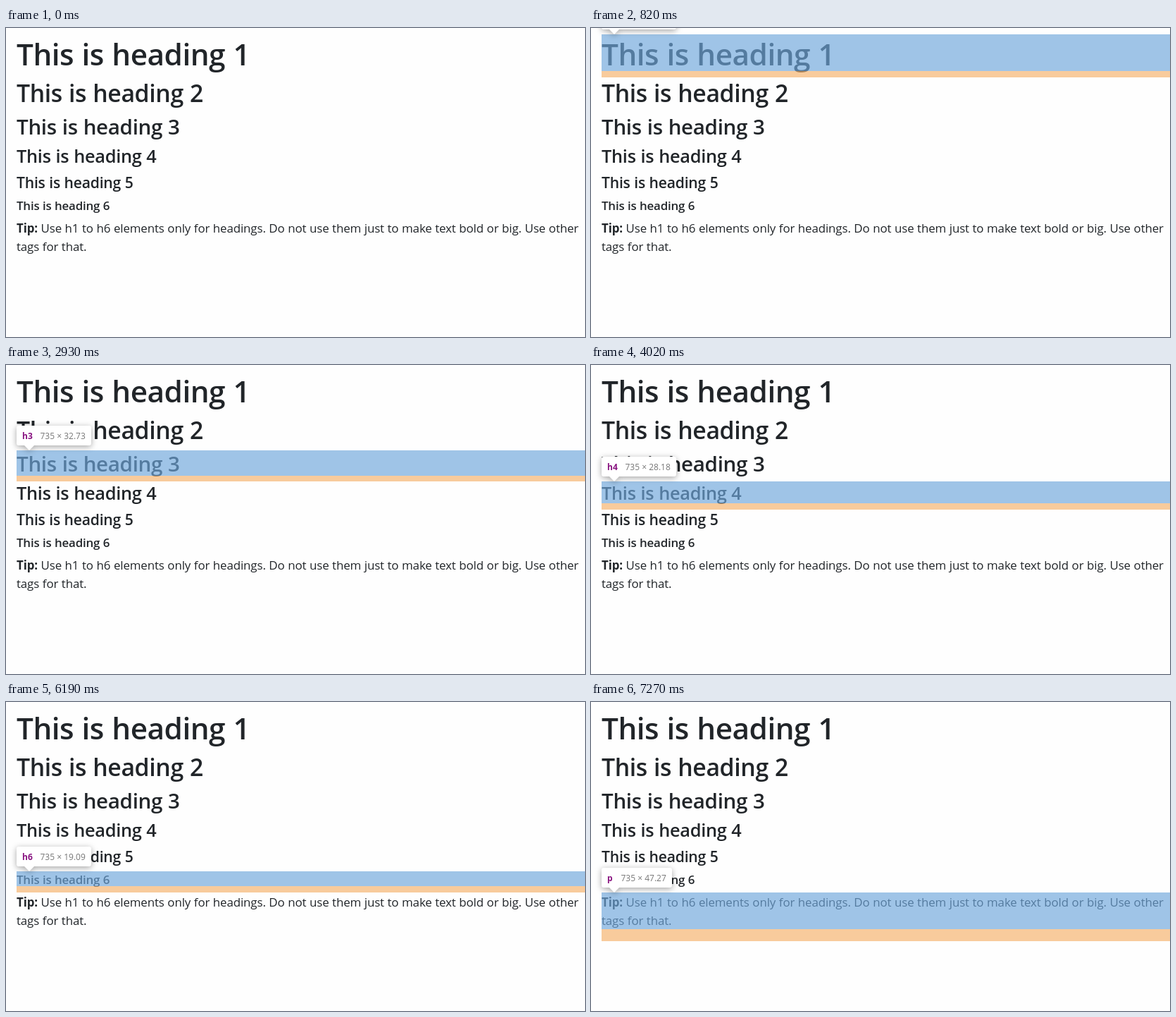
These frames come from a looping animation (822x438 px, 8600 ms). An HTML page:

```html
<!DOCTYPE html>
<html lang="en">
<head>
<meta charset="utf-8">
<title>Heading inspector</title>
<style>
  html, body { margin: 0; width: 100%; height: 100%; overflow: hidden; background: #fefefe; }
  svg { display: block; width: 822px; height: 438px; }
  text { font-family: "Open Sans", "Noto Sans", sans-serif; fill: #212529; white-space: pre; }
  #page text { word-spacing: .02em; }
  .heading { font-weight: 600; letter-spacing: -.011em; }
  .para { font-size: 16.9px; letter-spacing: -.0073em; }
  .para tspan { font-weight: 700; }
  #tip text { font-size: 12px; }
  #tip #tag { font-weight: 700; fill: #881280; }
  #tip #dims { fill: #777; }
  #bubble { fill: #fff; filter: drop-shadow(0 2px 4px rgba(0, 0, 0, .35)); }
</style>
</head>
<body>
<svg viewBox="0 0 822 438">
  <g id="page">
    <text class="para" x="15" y="290"><tspan>Tip:</tspan> Use h1 to h6 elements only for headings. Do not use them just to make text bold or big. Use other</text>
    <text class="para" x="15" y="316">tags for that.</text>
  </g>
  <g id="inspector">
    <rect id="content" x="15" width="807" fill="rgba(111,168,220,.66)"/>
    <rect id="margin" x="15" width="807" fill="rgba(246,178,107,.66)"/>
    <g id="tip">
      <g id="bubble">
        <rect id="box" x="15" y="-35" height="28" rx="3"/>
        <path d="M25-8H41L33 0Z"/>
      </g>
      <text id="tag" x="23" y="-16"></text>
      <text id="dims" y="-16"></text>
    </g>
  </g>
</svg>
<script>
const LOOP = 8600;
const $ = id => document.getElementById(id);

// start: highlight time; top, height, end: content box and bottom of its margin
const items = [
  { tag: 'h1', start: 820,  top: 9,   height: 52, end: 70,  size: 44,   baseline: 53 },
  { tag: 'h2', start: 1840, top: 70,  height: 42, end: 121, size: 35.2, baseline: 105 },
  { tag: 'h3', start: 2930, top: 121, height: 36, end: 165, size: 30.8, baseline: 151 },
  { tag: 'h4', start: 4020, top: 165, height: 31, end: 205, size: 26.4, baseline: 191 },
  { tag: 'h5', start: 5010, top: 205, height: 26, end: 240, size: 22,   baseline: 227 },
  { tag: 'h6', start: 6190, top: 240, height: 21, end: 270, size: 17.6, baseline: 258 },
  { tag: 'p',  start: 7270, top: 270, height: 52, end: 339 }
];

function addHeading({ tag, size, baseline }) {
  const text = document.createElementNS('http://www.w3.org/2000/svg', 'text');
  text.setAttribute('class', 'heading');
  text.setAttribute('x', 15);
  text.setAttribute('y', baseline);
  text.setAttribute('font-size', size * .96);
  text.textContent = 'This is heading ' + tag[1];
  $('page').append(text);
}

function setBand(id, top, bottom) {
  $(id).setAttribute('y', top);
  $(id).setAttribute('height', bottom - top);
}

function inspect(item) {
  $('inspector').style.display = item ? '' : 'none';
  if (!item) return;
  const { tag, top, height, end } = item;
  const isHeading = tag !== 'p';
  setBand('content', top, top + height);
  setBand('margin', top + height, end);
  $('tip').setAttribute('transform', `translate(0 ${top})`);
  $('box').setAttribute('width', isHeading ? 106 : 100);
  $('tag').textContent = tag;
  $('dims').setAttribute('x', isHeading ? 48.5 : 42.5);
  $('dims').textContent = `735 × ${(height / 1.1).toFixed(2)}`;
}

let shown;
function draw() {
  const t = performance.now() % LOOP;
  const current = items.filter(item => item.start <= t).pop() || null;
  if (current !== shown) inspect(shown = current);
  requestAnimationFrame(draw);
}

items.filter(item => item.size).forEach(addHeading);
draw();
</script>
</body>
</html>
```
